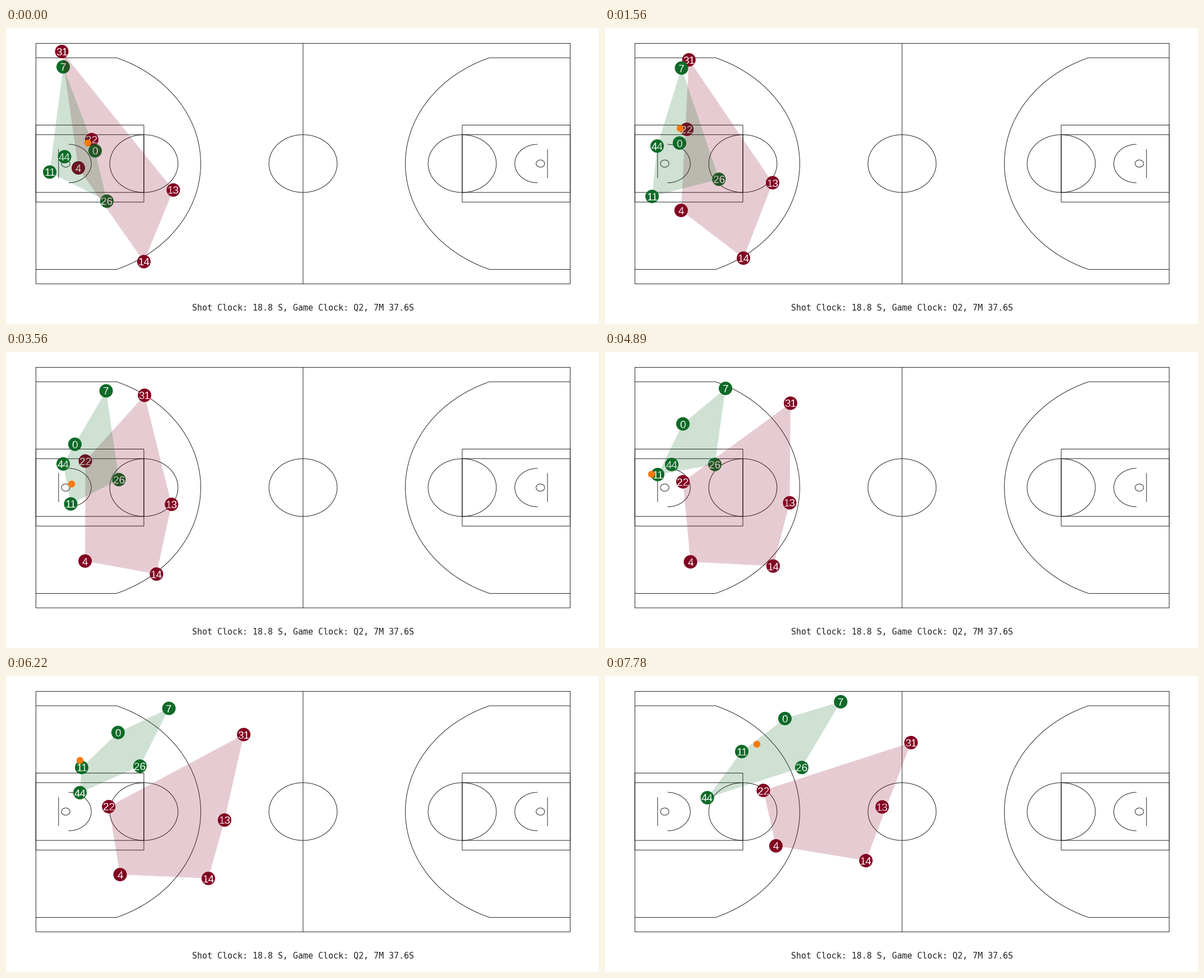
Animation of 1058x529 px, one loop 8000 ms. Source, as a matplotlib script:

```python
import numpy as np
import matplotlib.pyplot as plt
from matplotlib.animation import FuncAnimation
from matplotlib.patches import Circle, Ellipse, Polygon, Rectangle

W, H, DPI = 1058, 529, 100
PX = 72 / DPI  # one pixel in points

# Positions change 36 times per loop; the ticks are finer so each change
# falls close to its time, rounded to within one tick.
LOOP_MS, TICK_MS, MOVES, LEAD_MS = 8000, 40, 36, 34

RED, GREEN, ORANGE = "#820020", "#0d6b27", "#ff7909"

# Court scale: 94 x 50 feet
LEFT, TOP, FX, FY = 53.3, 27.4, 10.142, 8.596
MID_X, MID_Y = LEFT + 47 * FX, TOP + 25 * FY

# Turning points of each run, as move: (x, y)
RED_TEAM = {
    "31": {0: (99.5, 42), 12: (199, 68), 22: (331, 91.5), 35: (546, 119)},
    "22": {0: (153, 199.5), 7: (146, 181), 12: (149, 175.5), 22: (139, 232), 35: (282.5, 204.5)},
    "4": {0: (129, 250), 12: (141, 359.5), 22: (152.5, 375), 35: (305, 303.5)},
    "13": {0: (298.5, 289.5), 7: (299, 276.5), 12: (288.5, 273), 22: (329.5, 269.5), 35: (494.5, 234)},
    "14": {0: (246, 417.5), 12: (257, 404), 22: (300, 382.5), 35: (465.5, 330)},
}
GREEN_TEAM = {
    "7": {0: (102, 69.5), 12: (162, 71), 22: (215, 65), 35: (420.5, 46)},
    "0": {0: (159, 219.5), 12: (125.5, 187), 22: (139, 128.5), 35: (321, 76)},
    "44": {0: (104.5, 230), 12: (94, 203), 22: (119, 201), 28: (132, 208.5), 35: (182.5, 217.5)},
    "11": {0: (78, 257.5), 7: (84, 301), 16: (115.5, 271.5), 22: (94, 219), 28: (135, 163.5), 35: (244, 135)},
    "26": {0: (180, 309.5), 12: (209.5, 245), 22: (196, 201), 28: (239, 161), 35: (351, 163.5)},
}
BALL = {0: (146, 205.5), 7: (134, 179.5), 12: (100.5, 219), 16: (117, 236),
        22: (83, 218.5), 28: (132, 151), 35: (271, 122)}


def smooth_path(turns):
    """Hermite curve through the turning points, sampled at every move."""
    t = np.array(list(turns), float)
    p = np.array(list(turns.values()), float)
    m = np.gradient(p, t, axis=0, edge_order=2)
    s = np.arange(MOVES)
    i = np.clip(np.searchsorted(t, s, side="right") - 1, 0, len(t) - 2)
    h = (t[i + 1] - t[i])[:, None]
    u = (s - t[i])[:, None] / h
    return ((2 * u**3 - 3 * u**2 + 1) * p[i] + (u**3 - 2 * u**2 + u) * h * m[i]
            + (3 * u**2 - 2 * u**3) * p[i + 1] + (u**3 - u**2) * h * m[i + 1])


def convex_hull(points):
    pts = sorted(map(tuple, points))

    def chain(seq):
        out = []
        for x, y in seq:
            while len(out) > 1:
                (px, py), (qx, qy) = out[-2:]
                if (qx - px) * (y - py) - (qy - py) * (x - px) > 0:
                    break
                out.pop()
            out.append((x, y))
        return out[:-1]

    return chain(pts) + chain(pts[::-1])


fig = plt.figure(figsize=(W / DPI, H / DPI), dpi=DPI, facecolor="white")
ax = fig.add_axes([0, 0, 1, 1])
ax.set_xlim(0, W)
ax.set_ylim(H, 0)
ax.axis("off")

STROKE = dict(lw=0.85 * PX, zorder=1, snap=False)
OUTLINE = dict(fill=False, ec="black", **STROKE)


def line(xs, ys):
    ax.plot(xs, ys, color="black", solid_capstyle="butt", **STROKE)


def ellipse(x, feet):
    ax.add_patch(Ellipse((x, MID_Y), 2 * feet * FX, 2 * feet * FY, **OUTLINE))


def draw_half(side):
    """Draw one half of the court; side is 1 for left, -1 for right."""
    def at(feet):
        return MID_X + side * (feet - 47) * FX

    def arc(centre, radius, spread):
        a = np.linspace(-spread, spread, 160)
        line(at(centre + radius * np.cos(a)), MID_Y + radius * FY * np.sin(a))

    for half in (8, 6):
        x = min(at(0), at(19))
        ax.add_patch(Rectangle((x, MID_Y - half * FY), 19 * FX, 2 * half * FY, **OUTLINE))
    ellipse(at(19), 6)
    ellipse(at(5.25), 0.75)
    line([at(4)] * 2, [MID_Y - 3 * FY, MID_Y + 3 * FY])
    arc(5.75, 4, np.pi / 2)

    end = np.arcsin(22 / 23.75)
    arc(5.25, 23.75, end)
    corner = 5.25 + 23.75 * np.cos(end)
    for dy in (-22, 22):
        line([at(0), at(corner)], [MID_Y + dy * FY] * 2)


ax.add_patch(Rectangle((LEFT, TOP), 94 * FX, 50 * FY, **OUTLINE))
line([MID_X] * 2, [TOP, TOP + 50 * FY])
ellipse(MID_X, 6)
draw_half(1)
draw_half(-1)

ax.text(530, 505, "Shot Clock: 18.8 S, Game Clock: Q2, 7M 37.6S", ha="center",
        va="baseline", family="DejaVu Sans Mono", size=15 * PX, color="#222222")


class Team:
    def __init__(self, players, color, z):
        self.paths = [smooth_path(turns) for turns in players.values()]
        self.dots = [ax.add_patch(Circle((0, 0), 12, fc=color, lw=0, zorder=z))
                     for _ in players]
        self.labels = [ax.text(0, 0, n, ha="center", va="baseline", color="white",
                               family="Liberation Sans", size=19 * PX, zorder=z + 0.5)
                       for n in players]
        self.area = ax.add_patch(Polygon([(0, 0)] * 3, fc=color, alpha=0.2, lw=0, zorder=z + 3))

    def place(self, move):
        spots = [path[move] for path in self.paths]
        for (x, y), dot, label in zip(spots, self.dots, self.labels):
            dot.center = x, y
            label.set_position((x, y + 7))
        self.area.set_xy(convex_hull(spots))


teams = [Team(RED_TEAM, RED, 2), Team(GREEN_TEAM, GREEN, 3)]
ball_path = smooth_path(BALL)
ball = ax.add_patch(Circle((0, 0), 6.2, fc=ORANGE, lw=0, zorder=8))


def update(tick):
    move = min((tick * TICK_MS + LEAD_MS) * MOVES // LOOP_MS, MOVES - 1)
    for team in teams:
        team.place(move)
    ball.center = tuple(ball_path[move])
    return []


anim = FuncAnimation(fig, update, frames=LOOP_MS // TICK_MS, interval=TICK_MS,
                     repeat=True, repeat_delay=0, blit=False)
plt.show()
```
